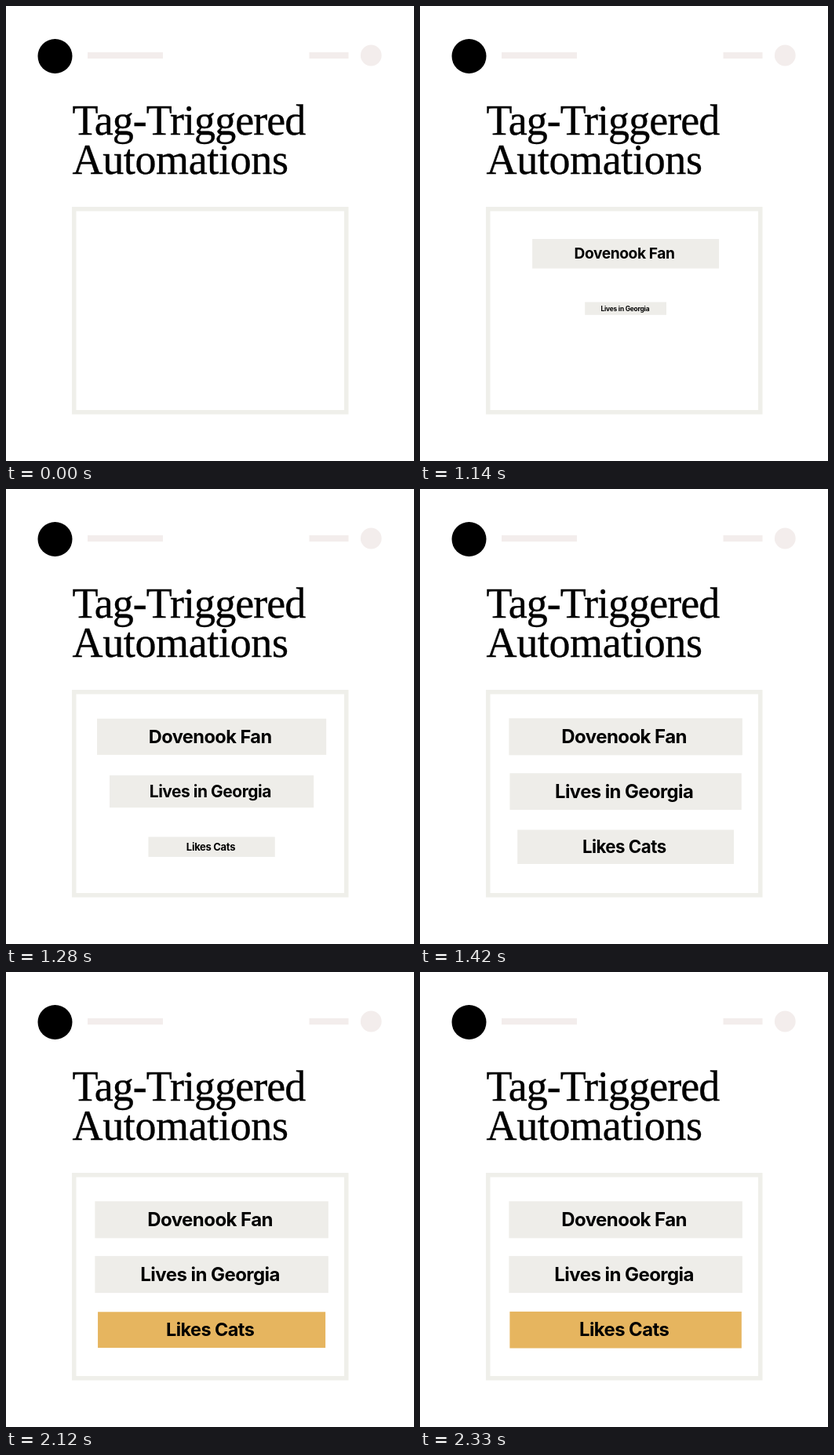
Recreate the animation shown at these times as an HTML page. Size 520 by 580 pixels, loop 2.4 s.

```html
<!DOCTYPE html>
<html lang="en">
<head>
<meta charset="utf-8">
<title>Tag-Triggered Automations</title>
<style>
  html, body { margin: 0; width: 100%; height: 100%; overflow: hidden; background: #fff; }
  svg { display: block; width: 520px; height: 580px; }
  .title { font: 54px "Liberation Serif", "Times New Roman", serif; stroke: #000; stroke-width: .35; }
  .label { font: 700 24px Inter, Arial, sans-serif; letter-spacing: -.55px; text-anchor: middle; }
</style>
</head>
<body>
<svg viewBox="0 0 520 580">
  <circle cx="62.5" cy="64" r="22"/>
  <g fill="#f3edec">
    <rect x="104" y="59" width="96" height="8"/>
    <rect x="386.5" y="59" width="50" height="8"/>
    <circle cx="465.3" cy="63" r="13.4"/>
  </g>
  <g class="title">
    <text x="84.5" y="164" letter-spacing="-.95">Tag-Triggered</text>
    <text x="84.5" y="214" letter-spacing="-.35">Automations</text>
  </g>
  <rect x="86.75" y="258.75" width="347" height="259" fill="none" stroke="#efefea" stroke-width="5.5"/>
  <g id="tags"></g>
</svg>
<script>
const LOOP = 2400, STEP = 70, FIRST = 1000, SECOND = 1140;
const GROW = 462, PICK = 2120;
const GREY = "#eeede9", GOLD = "#e6b55f";

const tags = [
  { text: "Dovenook Fan", y: 315.8, start: 987 },
  { text: "Lives in Georgia", y: 385.6, start: 1093 },
  { text: "Likes Cats", y: 456.2, start: 1198 }
];

function add(parent, name, attrs, text = "") {
  const el = document.createElementNS("http://www.w3.org/2000/svg", name);
  for (const key in attrs) el.setAttribute(key, attrs[key]);
  el.textContent = text;
  return parent.appendChild(el);
}

for (const tag of tags) {
  tag.group = add(document.getElementById("tags"), "g", {});
  tag.rect = add(tag.group, "rect", { x: -148.75, y: -23.5, width: 297.5, height: 47 });
  add(tag.group, "text", { class: "label", x: -2, y: 8.3 }, tag.text);
}

// The motion runs in 70 ms steps; the first pose is held for two of them.
function stepped(t) {
  if (t < FIRST) return 0;
  if (t < SECOND) return SECOND - STEP;
  return SECOND + STEP * Math.floor((t - SECOND) / STEP);
}

function easeOut(p) {
  p = Math.min(1, Math.max(0, p));
  return 1 - (1 - p) ** 4;
}

function draw(now) {
  const t = stepped(now % LOOP);
  tags.forEach((tag, i) => {
    const picked = i === 2 && t >= PICK;
    const scale = picked
      ? 1 - 0.025 * 0.65 ** ((t - PICK) / STEP)
      : easeOut((t - tag.start) / GROW);
    tag.group.setAttribute("visibility", scale > 0 ? "visible" : "hidden");
    tag.group.setAttribute("transform", `translate(262.1 ${tag.y}) scale(${scale})`);
    tag.rect.setAttribute("fill", picked ? GOLD : GREY);
  });
}

function tick() {
  draw(performance.now());
  requestAnimationFrame(tick);
}
tick();
</script>
</body>
</html>
```
